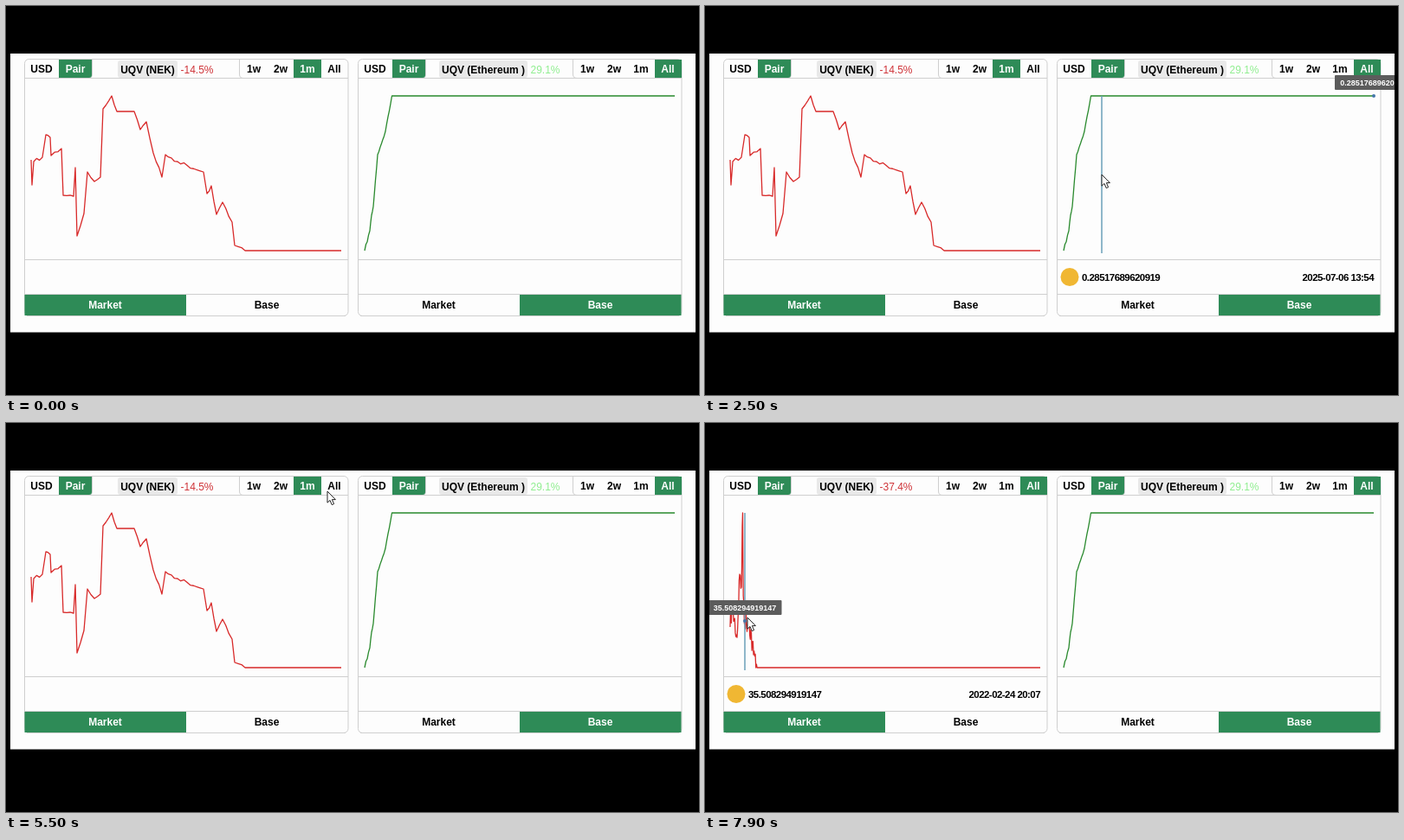
An HTML page for the animation above (8 s loop, 800x450 px).

```html
<!DOCTYPE html>
<html lang="en">
<head>
<meta charset="utf-8">
<title>Price charts</title>
<style>
html, body { margin: 0; width: 100%; height: 100%; overflow: hidden; background: #000; }
svg { display: block; width: 800px; height: 450px; font: bold 12px "Liberation Sans", Arial, sans-serif; }
.curve { fill: none; stroke-width: 1.3; stroke-linejoin: round; }
.foot { font-size: 11.5px; letter-spacing: -.56px; }
.tip { font-size: 9px; fill: #fff; }
</style>
</head>
<body>
<svg id="stage" viewBox="0 0 800 450">
  <clipPath id="page"><rect x="5" y="55" width="791" height="322.5"/></clipPath>
  <rect width="800" height="450"/>
  <rect x="5" y="55" width="791" height="322.5" fill="#fdfdfd"/>
</svg>
<script>
const LOOP = 8000, STEP = 100, SWITCH = 5700, LAG = 22;
const TOP = 104, BOTTOM = 283;
const GREEN = '#2e8b57', GRAY = '#cfcfcf', RED = '#cf3338';
const stage = document.getElementById('stage');

function add(parent, tag, attrs, text) {
  const el = document.createElementNS('http://www.w3.org/2000/svg', tag);
  set(el, attrs);
  if (text) el.textContent = text;
  parent.appendChild(el);
  return el;
}
function set(el, attrs) {
  for (const key in attrs) el.setAttribute(key, attrs[key]);
}
const show = (el, on) => set(el, { visibility: on ? 'visible' : 'hidden' });
const clamp = (v, lo, hi) => Math.min(hi, Math.max(lo, v));
const label = (parent, x, y, text, fill = '#000') =>
  add(parent, 'text', { x, y, fill, 'text-anchor': 'middle' }, text);

// Interpolates rows that are sorted by their first column.
function sample(rows, at) {
  const i = Math.max(1, rows.findIndex(r => r[0] >= at));
  const [a, b] = [rows[i - 1], rows[i]];
  const u = (at - a[0]) / (b[0] - a[0]);
  return a.map((v, n) => v + (b[n] - v) * u);
}

// Fills each slope between key points with small seeded jumps.
function roughen(keys, step, amp) {
  let seed = 7;
  const random = () => (seed = seed * 16807 % 2147483647) / 2147483647;
  const pts = [keys[0]];
  keys.slice(1).forEach((b, i) => {
    const a = keys[i];
    const n = a[1] === b[1] ? 1 : Math.ceil((b[0] - a[0]) / step);
    for (let k = 1; k < n; k++) {
      const [x, y] = sample([a, b], a[0] + (b[0] - a[0]) * k / n);
      pts.push([x, clamp(y + amp * (random() * 2 - 1), TOP, BOTTOM)]);
    }
    pts.push(b);
  });
  return pts;
}

// Each chart has one known reading and a last reading; the rest is linear.
function makeChart(path, step, amp, ref, last, decimals) {
  const pts = roughen(path.split(' ').map(p => p.split(',').map(Number)), step, amp);
  const end = pts[pts.length - 1];
  const slope = (ref.v - last.v) / (sample(pts, ref.x)[1] - end[1]);
  return { d: 'M' + pts.join(' '), pts, end, slope, ref, last, decimals };
}
// The flat tail holds no samples, so it snaps to the last point.
function read({ pts, end, slope, ref, last, decimals }, x) {
  if (x > pts[pts.length - 2][0])
    return { x: end[0], y: end[1], value: String(last.v), date: stamp(last.t) };
  const y = sample(pts, x)[1];
  const time = ref.t + (last.t - ref.t) * (x - ref.x) / (end[0] - ref.x);
  return { x, y, value: (last.v + (y - end[1]) * slope).toFixed(decimals), date: stamp(time) };
}
const utc = s => Date.parse(s + 'Z');
const stamp = t => new Date(Math.round(t / 6e4) * 6e4).toISOString().slice(0, 16).replace('T', ' ');

const month = makeChart(
  '29,178 30,207 32,180 42,175 46,149 51,152 52,173 64,165 66,219 78,220 80,187 82,266 90,240 94,192 ' +
  '102,203 109,198 112,119 122,104 128,122 148,122 155,143 162,134 170,170 180,198 184,172 198,180 ' +
  '228,192 232,217 237,208 243,241 250,227 261,250 264,277 276,283 387,283', 4, 2,
  { x: 132, v: 25.760392135779, t: utc('2022-04-09T07:04') },
  { v: 20.468271903893, t: utc('2022-04-29T19:01') }, 12);
const all = makeChart(
  '29,236 31,210 37,248 40,175 42,190 43.5,104 44.2,200 46,229 51,228 56,268 61.5,283 387,283', .7, 15,
  { x: 46, v: 35.508294919147, t: utc('2022-02-24T20:07') },
  { v: 20.575016068816, t: utc('2025-07-06T13:54') }, 12);
const base = makeChart(
  '414,283 420,260 422,242 424,232 429,172 438,145 445.5,104 772,104', 1.5, 1.5,
  { x: 422, v: 0.23568627, t: utc('2022-01-23T21:45') },
  { v: 0.28517689620919, t: utc('2025-07-06T13:54') }, 8);

function makePanel(dx, title, chipX, chipW, pct, pctColor, lineColor, baseTab) {
  const g = add(stage, 'g', { transform: `translate(${dx} 0)` });
  const line = d => add(g, 'path', { d, fill: 'none', stroke: GRAY });
  const tabs = {};
  add(g, 'rect', { x: 21.5, y: 61.5, width: 373.5, height: 297, rx: 5, fill: 'none', stroke: GRAY });
  line('M24 358.5H392');
  line('M21.5 83.5H395M99.5 62V79Q99.5 83.5 95 83.5M269.5 62V79Q269.5 83.5 274 83.5');
  line('M21.5 293.5H395M21.5 333.5H395');
  add(g, 'path', { d: 'M61 62H99V80Q99 83 96 83H61Z', fill: GREEN });
  const active = add(g, 'rect', { y: 62, height: 21, fill: GREEN });
  add(g, 'rect', { x: baseTab ? 208 : 21.5, y: 334, width: 186.5, height: 24, fill: GREEN });
  label(g, 41, 77, 'USD');
  label(g, 80, 77, 'Pair', '#fff');
  ['1w', '2w', '1m', 'All'].forEach((name, i) => {
    tabs[name] = label(g, 286 + 31 * i, 77, name);
  });
  label(g, 114.5, 349.5, 'Market', baseTab ? '#000' : '#fff');
  label(g, 301, 349.5, 'Base', baseTab ? '#fff' : '#000');
  add(g, 'rect', { x: chipX, y: 63, width: chipW, height: 20, rx: 3, fill: '#e9e9e9' });
  label(g, chipX + chipW / 2, 77.5, title);
  const change = add(g, 'text', { x: chipX + chipW + 3.5, y: 77.5, fill: pctColor, 'font-weight': 400 }, pct);
  const curve = add(stage, 'path', { class: 'curve', stroke: lineColor });
  const foot = add(g, 'g', { class: 'foot' });
  add(foot, 'circle', { cx: 36, cy: 313.5, r: 10.5, fill: '#f0b733' });
  const value = add(foot, 'text', { x: 50, y: 317.5 });
  const date = add(foot, 'text', { x: 387, y: 317.5, 'text-anchor': 'end' });
  return { dx, tabs, active, change, curve, foot, value, date };
}
function pickRange(panel, name) {
  for (const key in panel.tabs) set(panel.tabs[key], { fill: key === name ? '#fff' : '#000' });
  set(panel.active, name === 'All' ? { x: 364, width: 31 } : { x: 332, width: 32 });
}

const left = makePanel(0, 'UQV (NEK)', 129, 69, '-14.5%', RED, '#d82a2a', false);
const right = makePanel(385, 'UQV (Ethereum )', 115, 102, '29.1%', '#90ee90', '#2a8a2e', true);
pickRange(right, 'All');
set(right.curve, { d: base.d });

const hover = add(stage, 'g', { 'clip-path': 'url(#page)' });
const guide = add(hover, 'path', { stroke: '#6a9fb8', 'stroke-width': 1.5 });
const dot = add(hover, 'circle', { r: 2, fill: '#4477aa' });
const box = add(hover, 'rect', { height: 17, rx: 1, fill: '#5c5c5c' });
const tip = add(hover, 'text', { class: 'tip', 'text-anchor': 'middle' });
const arrow = add(stage, 'path', {
  d: 'M0 0V13.2L3 10.4L5.2 15.6L7.6 14.6L5.4 9.6H9.4Z', fill: '#fff', stroke: '#222'
});

// Pointer path: time, x, y
const PATH = [
  [100, 24, 205], [900, 92, 183], [1200, 135.5, 179], [1800, 372, 186], [2100, 500, 192],
  [2400, 458, 195], [2500, 458, 195], [2900, 470, 197], [3300, 414, 202], [3500, 423, 200],
  [3800, 450, 180], [4200, 350, 115], [4600, 332, 104.5], [5500, 371, 79], [5600, 371, 79],
  [6200, 236.5, 182], [6900, 45, 205], [7700, 24, 214], [7900, 49, 225]
];

function render(ms) {
  const t = Math.floor(ms % LOOP / STEP) * STEP;
  const late = t >= SWITCH;
  const leftChart = late ? all : month;
  set(left.curve, { d: leftChart.d });
  left.change.textContent = late ? '-37.4%' : '-14.5%';
  pickRange(left, late ? 'All' : '1m');

  [left.foot, right.foot, hover, arrow].forEach(el => show(el, false));
  if (t < PATH[0][0]) return;
  const [, x, y] = sample(PATH, t);
  show(arrow, true);
  set(arrow, { transform: `translate(${x} ${y})` });

  const panel = x < 400 ? left : right;
  const inside = x - panel.dx > 21 && x - panel.dx < 395 && y > 84 && y < 293;
  if (!inside) return;
  // The guide trails the pointer slightly.
  const trail = Math.round(sample(PATH, t - LAG)[1]);
  const gx = clamp(trail, 29 + panel.dx, 387 + panel.dx);
  const r = read(panel === left ? leftChart : base, gx);
  show(panel.foot, true);
  show(hover, true);
  panel.value.textContent = r.value;
  panel.date.textContent = r.date;
  set(guide, { d: `M${gx} 104V286` });
  set(dot, { cx: r.x, cy: r.y });
  tip.textContent = r.value;
  const w = Math.ceil((r.value.length - 1) * 5.005 + 14.5);
  set(box, { x: r.x - w / 2, y: r.y - 24, width: w });
  set(tip, { x: r.x, y: r.y - 12.3 });
}

function frame() {
  render(performance.now());
  requestAnimationFrame(frame);
}
frame();
</script>
</body>
</html>
```
